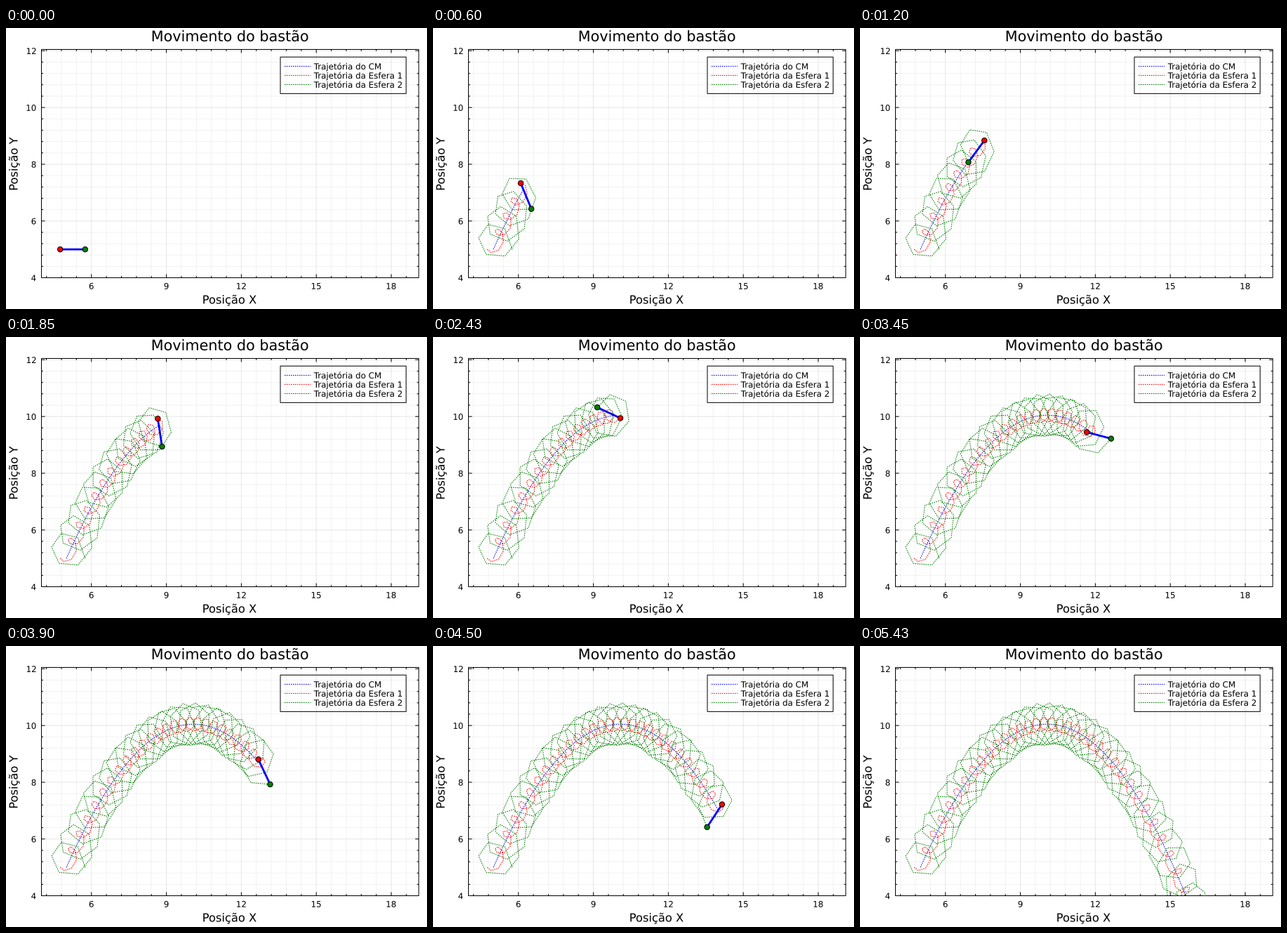
A matplotlib script that plays this animation: 600x400 px, repeating every 6.07 s.

```python
import numpy as np
import matplotlib.pyplot as plt
from matplotlib.animation import FuncAnimation
from matplotlib.collections import LineCollection
from matplotlib.patches import PathPatch, Rectangle
from matplotlib.path import Path
from matplotlib.textpath import TextPath

plt.rcParams.update({
    "font.family": "DejaVu Sans",
    "lines.scale_dashes": False,
    "path.simplify": False,
})

W, H, DPI = 600, 400, 100
PX = 72 / DPI                                   # one pixel in points
LEFT, RIGHT, TOP, BOTTOM = 50.5, 588.2, 30.5, 355.5
TICK_MS, STEP_MS, LOOP_MS = 10, 25, 6070
DOTS = (0, (1.5 * PX, 1.5 * PX))
TITLE, GUIDE, SMALL = 20.75, 16.3, 11.86        # text sizes in pixels

# Thrown rod: the centre falls under gravity while the rod spins.
DT, G, SPIN = 0.01, 9.81, 100.0
VX, VY = 5.0, 10.0
R1, R2 = 0.25, 0.75

n = np.arange(LOOP_MS // STEP_MS + 1)
centre = np.column_stack([
    5 + VX * DT * n,
    5 + VY * DT * n - G * DT**2 * n * (n + 1) / 2,
])
angle = SPIN * DT * n
arm = np.column_stack([np.cos(angle), np.sin(angle)])
ball1 = centre - R1 * arm
ball2 = centre + R2 * arm

X0, X1 = 4, centre[-1, 0] + 2
Y0, Y1 = 4, centre[:, 1].max() + 2


def sx(x):
    return LEFT + (x - X0) * (RIGHT - LEFT) / (X1 - X0)


def sy(y):
    return BOTTOM - (y - Y0) * (BOTTOM - TOP) / (Y1 - Y0)


fig = plt.figure(figsize=(W / DPI, H / DPI), dpi=DPI, facecolor="white")

page = fig.add_axes([0, 0, 1, 1])
page.set(xlim=(0, W), ylim=(H, 0))
page.axis("off")


def strokes(segments, width, alpha=1.0):
    page.add_collection(LineCollection(
        segments, linewidths=width * PX, colors="black", alpha=alpha,
        snap=False), autolim=False)


def box(x0, y0, x1, y1, fill):
    page.add_patch(Rectangle((x0, y0), x1 - x0, y1 - y0, fc=fill, ec="black",
                             lw=PX, snap=False))


def label(s, x, y, size, align="center", upright=False):
    """Place text by its ink box; y is the baseline."""
    path = TextPath((0, 0), s, size=size)
    ink = path.get_extents()
    anchor = {"left": ink.x0, "center": (ink.x0 + ink.x1) / 2,
              "right": ink.x1}[align]
    along, up = path.vertices[:, 0] - anchor, path.vertices[:, 1]
    if upright:
        points = np.column_stack([x - up, y - along])
    else:
        points = np.column_stack([x + along, y - up])
    page.add_patch(PathPatch(Path(points, path.codes), fc="black", lw=0))


def vertical(x, a, b):
    return [(x, a), (x, b)]


def horizontal(y, a, b):
    return [(a, y), (b, y)]


# Grid and ticks
x_major, y_major = np.arange(6, 19, 3), np.arange(4, 13, 2)
x_minor = [6 + 0.6 * i for i in range(-3, 22) if i % 5]
y_minor = [4 + 0.4 * i for i in range(1, 20) if i % 5]

for xs, ys, alpha, size in ((x_minor, y_minor, 0.05, 2.5),
                            (x_major, y_major, 0.1, 5)):
    lines, ticks = [], []
    for x in map(sx, xs):
        lines.append(vertical(x, TOP, BOTTOM))
        ticks += [vertical(x, BOTTOM, BOTTOM - size),
                  vertical(x, TOP, TOP + size)]
    for y in map(sy, ys):
        lines.append(horizontal(y, LEFT, RIGHT))
        ticks += [horizontal(y, LEFT, LEFT + size),
                  horizontal(y, RIGHT, RIGHT - size)]
    strokes(lines, 1, alpha)
    strokes(ticks, 1)

box(LEFT, TOP, RIGHT, BOTTOM, "none")

for x in x_major:
    label(str(x), sx(x), 371.7, SMALL)
for y in y_major:
    label(str(y), 42.5, sy(y) + 4.7, SMALL, "right")

label("Movimento do bastão", 319.6, 18.9, TITLE)
label("Posição X", 319, 392.4, GUIDE)
label("Posição Y", 16.5, 192.8, GUIDE, upright=True)

# Legend
box(391, 41.3, 570.2, 93.4, "white")
series = (("Trajetória do CM", "blue", centre),
          ("Trajetória da Esfera 1", "red", ball1),
          ("Trajetória da Esfera 2", "green", ball2))
for row, (name, color, _) in enumerate(series):
    y = 54.5 + 13 * row
    page.plot([397, 434], [y, y], color=color, lw=1.1 * PX, ls=DOTS,
              snap=False)
    label(name, 438.7, y + 4.5, SMALL, "left")

# Moving parts, clipped to the plot area
plot = fig.add_axes([LEFT / W, 1 - BOTTOM / H,
                     (RIGHT - LEFT) / W, (BOTTOM - TOP) / H])
plot.set(xlim=(X0, X1), ylim=(Y0, Y1))
plot.axis("off")

trails = [plot.plot([], [], color=color, lw=1.1 * PX, ls=DOTS, snap=False)[0]
          for _, color, _ in series]
rod, = plot.plot([], [], color="blue", lw=2.8 * PX, snap=False,
                 solid_capstyle="butt")
balls = plot.scatter([0, 0], [0, 0], s=(7.4 * PX)**2, c=["red", "green"],
                     edgecolors="black", linewidths=PX, zorder=3)


def draw(i):
    k = i * TICK_MS // STEP_MS
    for trail, (_, _, points) in zip(trails, series):
        trail.set_data(*points[:k + 1].T)
    ends = np.array([ball1[k], ball2[k]])
    rod.set_data(*ends.T)
    balls.set_offsets(ends)
    return [*trails, rod, balls]


anim = FuncAnimation(fig, draw, frames=LOOP_MS // TICK_MS, interval=TICK_MS,
                     init_func=lambda: draw(0), repeat=True, repeat_delay=0)
plt.show()
```
